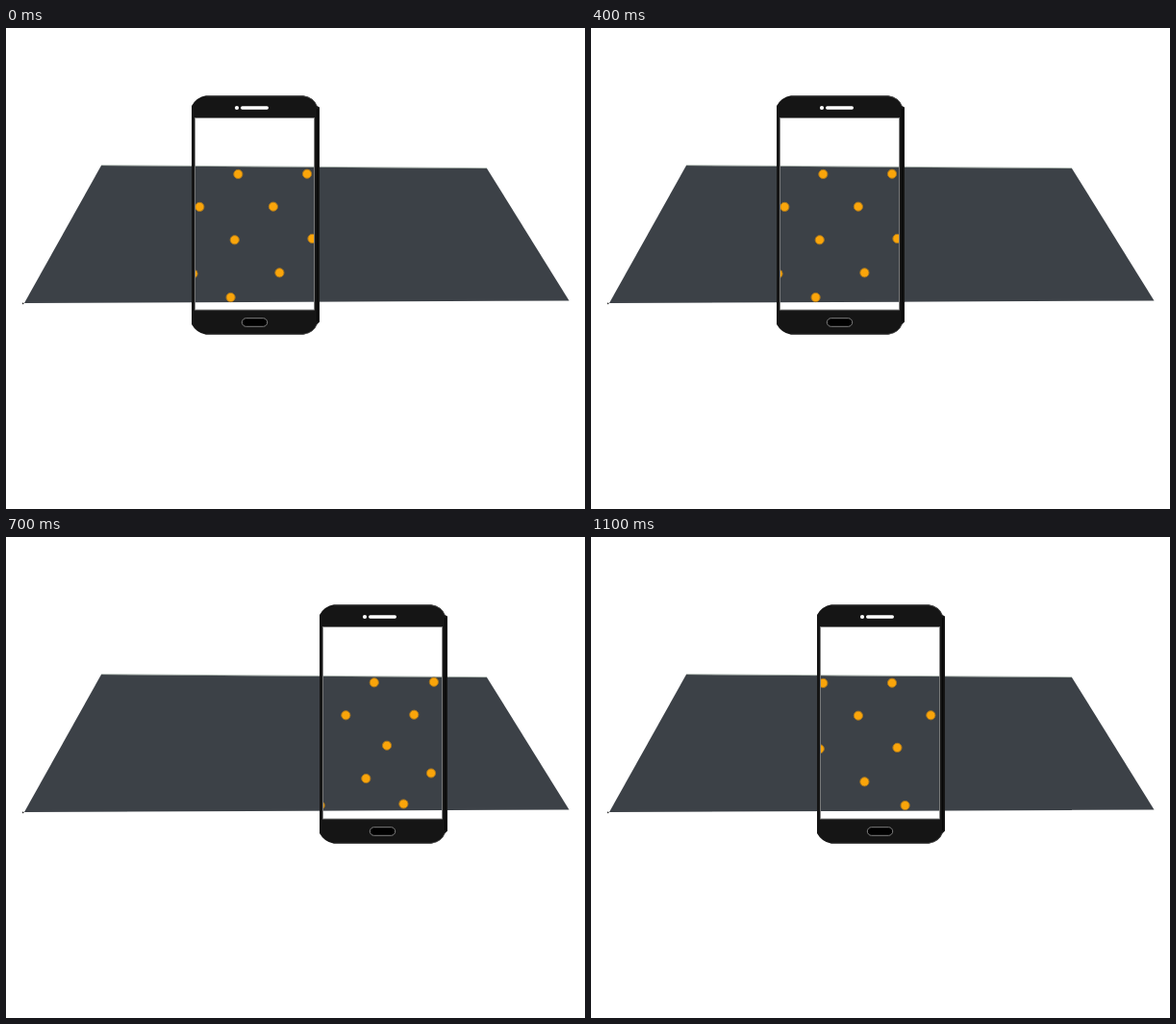
An HTML page for the animation above (1.2 s loop, 602 by 500 pixels).

```html
<!DOCTYPE html>
<html lang="en">
<head>
<meta charset="utf-8">
<title>Phone scanning a surface</title>
<style>
  html, body { margin: 0; width: 100%; height: 100%; overflow: hidden; background: #fff; }
  svg { display: block; }
</style>
</head>
<body>
<svg width="602" height="500" viewBox="0 0 602 500">
  <defs>
    <clipPath id="view"><rect id="lens" y="93.5" width="124" height="199.5"/></clipPath>
  </defs>
  <path d="M99 143 L500 146 L585.5 283.5 L19 286Z" fill="#3c4147"/>
  <path d="M99 142.7 L500 145.7" stroke="#7d8c82" stroke-width=".6"/>
  <circle cx="17.7" cy="286.3" r=".9" fill="#333"/>
  <g id="dots" clip-path="url(#view)" fill="#faa50a" stroke="#a8761e"></g>
  <g id="phone">
    <path fill="#151515" fill-rule="evenodd"
      d="M0 81 Q5 72 15 70.3 H116 Q127 72 130.5 81 L133 82.5 V305.5 L130.5 308 Q127 317 116 318.8 H15 Q5 317 0 308Z
         M3.5 93.5 V293 H127.5 V93.5Z"/>
    <path d="M15 70.8 H116 Q127 72.4 130.3 81.5 M130.3 307.5 Q127 316.8 116 318.3 H15" fill="none" stroke="#555" stroke-width=".7"/>
    <rect x="3.5" y="93.5" width="124" height="199.5" fill="none" stroke="#808080" stroke-width=".9"/>
    <path d="M130.7 84 V305" stroke="#000" stroke-width=".8"/>
    <circle cx="47" cy="83" r="2.1" fill="#fff"/>
    <rect x="51" y="81.3" width="29" height="3.4" rx="1.7" fill="#fff"/>
    <rect x="52.3" y="301.7" width="26.4" height="8.6" rx="4.3" fill="#000" stroke="#8a8a8a" stroke-width=".9"/>
  </g>
</svg>
<script>
  // Phone stops from left to right, visited back and forth.
  const stops = [91, 127, 193, 235, 286, 326, 366];
  const stepMs = 100;
  const cycle = 2 * (stops.length - 1);
  const startStep = 10;

  const byId = id => document.getElementById(id);
  const dotLayer = byId("dots"), phone = byId("phone"), lens = byId("lens");

  function addDot(x, y) {
    const dot = document.createElementNS("http://www.w3.org/2000/svg", "circle");
    dot.setAttribute("cx", x);
    dot.setAttribute("cy", y);
    dot.setAttribute("r", 4.6);
    dotLayer.append(dot);
  }

  // One row of dots: the bow pushes its later dots right, the rise lifts its far end.
  function addRow(count, from, to, y, bow, rise) {
    for (let i = 0; i < count; i++) {
      const t = i / (count - 1);
      addDot(from + (to - from) * t + bow * t * t * (1 - t), y - rise * t * t);
    }
  }
  addRow(6, 173.5, 493.5, 152, 120, 2);
  addRow(6, 127, 487.4, 186, 70, 2);
  addRow(5, 158.6, 465.8, 220.7, 50, 7);
  addRow(4, 194.5, 442, 255.5, 100, 10);
  addRow(5, 143.7, 484.5, 280.3, 100, 5);

  function draw(ms) {
    const step = (Math.floor(ms / stepMs) + startStep) % cycle;
    const x = stops[Math.min(step, cycle - step)];
    phone.setAttribute("transform", `translate(${x} 0)`);
    lens.setAttribute("x", x + 3.5);
  }

  const start = performance.now();
  function tick() {
    draw(performance.now() - start);
    requestAnimationFrame(tick);
  }
  draw(0);
  requestAnimationFrame(tick);
</script>
</body>
</html>
```
